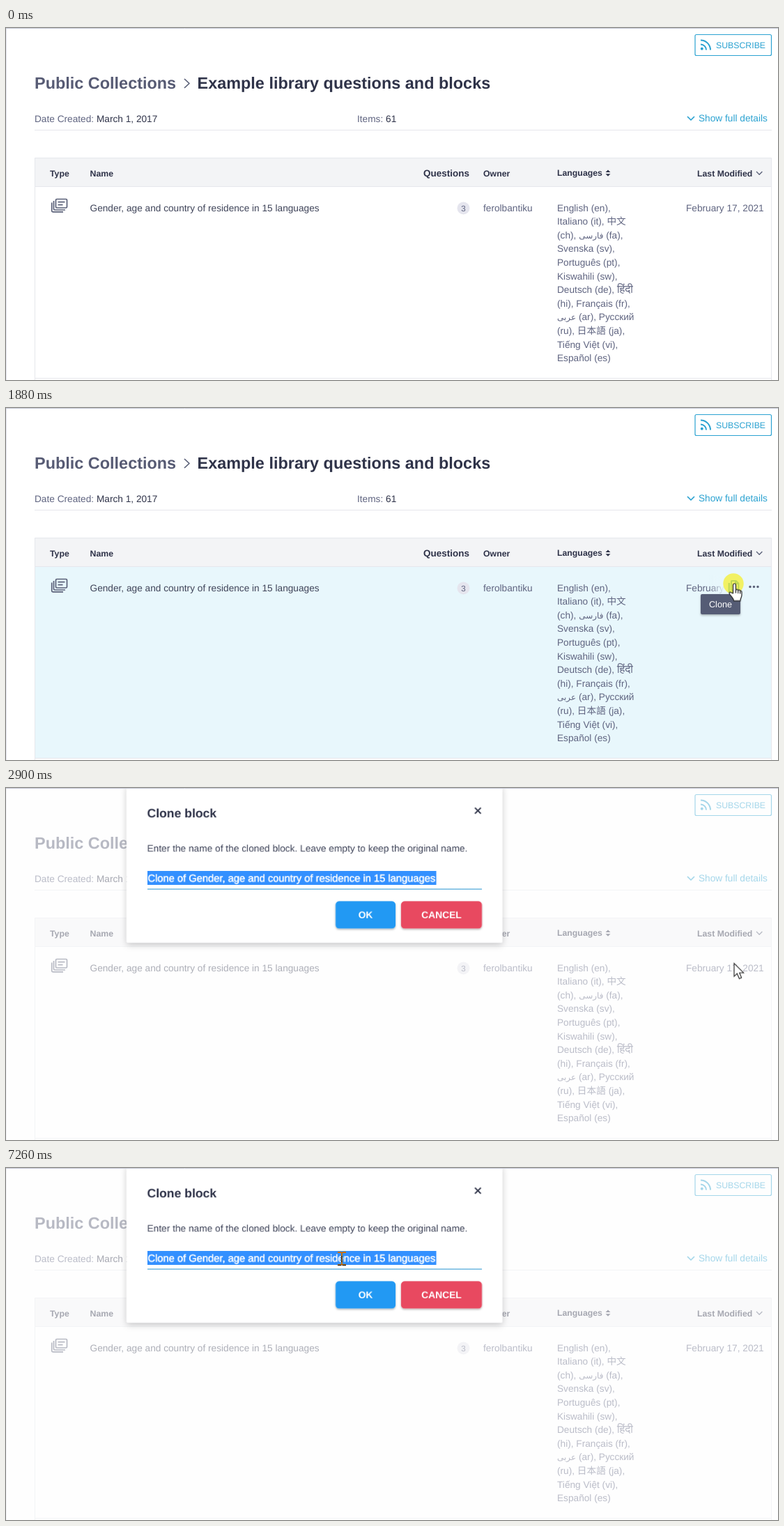
These frames come from a looping animation (1108 px wide and 505 px high, 8000 ms). An HTML page:

```html
<!DOCTYPE html>
<html lang="en">
<head>
<meta charset="utf-8">
<title>Clone block</title>
<style>
  html, body { margin: 0; width: 100%; height: 100%; overflow: hidden; background: #fff; }
  svg { display: block; width: 1108px; height: 505px; }
  text { font: 13.68px "Liberation Sans", Arial, "Noto Sans", "Noto Sans CJK SC", sans-serif;
         fill: #5f6480; text-rendering: geometricPrecision; white-space: pre; }
  .dark { fill: #2f3349; }
  .name { fill: #3f4459; }
  .title { font-size: 23.45px; font-weight: bold; }
  .head text { font-size: 12.3px; font-weight: bold; fill: #2f3349; }
  .head .big { font-size: 13.5px; }
  .link { fill: #2ba2d1; }
  .small { font-size: 12.3px; }
  .arabic { font-size: 12px; }
  .hindi { font-size: 16px; }
  .line { fill: none; stroke: #5a6078; stroke-width: 1.7; stroke-linejoin: round; }
  .blue { stroke: #2ba2d1; }
  .rule { fill: none; stroke: #e6e7ec; }
  .button { font-size: 13.8px; font-weight: bold; fill: #fff; text-anchor: middle; }
  .field { font-size: 14.71px; }

  /* 1% of the loop is 80 ms */
  .hover, .over, .click, .selected { animation: hover 8s step-end infinite; }
  .over { animation-name: over; }
  .click { animation-name: click; }
  .selected { animation-name: selected; }
  .focus { animation: focus 8s linear infinite; }
  .dimmer { animation: dim 8s linear infinite; }
  .dialog { transform-origin: 442.5px 109px; animation: pulse 8s linear infinite; }
  .pointer { animation: move 8s linear infinite, arrow 8s step-end infinite; }
  .hand { animation-name: move, over; }
  .beam { animation-name: move, beam; mix-blend-mode: difference; }

  @keyframes hover { 0%, 100% { opacity: 0 } 2.49% { opacity: 1 } 29.3% { opacity: 0 } }
  @keyframes over { 0%, 100% { opacity: 0 } 8.75% { opacity: 1 } 29.3% { opacity: 0 } }
  @keyframes click { 0%, 100% { opacity: 0 } 23.49% { opacity: 1 } 25.99% { opacity: 0 } }
  @keyframes arrow {
    0% { opacity: 0 } 2.49% { opacity: 1 } 8.75% { opacity: 0 }
    29.3% { opacity: 1 } 66.25%, 100% { opacity: 0 }
  }
  @keyframes beam { 0% { opacity: 0 } 66.25%, 100% { opacity: 1 } }
  @keyframes selected { 0% { opacity: 0 } 33%, 100% { opacity: 1 } }
  @keyframes focus { 0%, 33% { opacity: 0 } 36.2%, 100% { opacity: 1 } }
  @keyframes dim {
    0% { opacity: 0 }
    26% { opacity: 0; animation-timing-function: ease }
    32.25%, 100% { opacity: .58 }
  }
  @keyframes pulse {
    0%, 26% { opacity: 0; transform: scale(.3) }
    27.25% { transform: scale(1.1) }
    28.5% { transform: scale(.903) }
    29.75% { opacity: 1; transform: scale(1.03) }
    31% { transform: scale(.97) }
    32.25%, 100% { opacity: 1; transform: scale(1) }
  }
  @keyframes move {
    0% { transform: translate(1048px, 400px) }
    3.2% { transform: translate(1048px, 400px); animation-timing-function: cubic-bezier(.25, .5, .3, 1) }
    12.6%, 59.2% { transform: translate(1045px, 251.5px) }
    61.9% { transform: translate(975px, 213px) }
    64.4% { transform: translate(790px, 132px) }
    66.25% { transform: translate(615px, 84px) }
    67.5% { transform: translate(520px, 79px) }
    69.4% { transform: translate(474px, 112px) }
    70% { transform: translate(475px, 120px) }
    70.8%, 72.6% { transform: translate(469px, 113.5px) }
    78.4%, 80.1% { transform: translate(478px, 127px) }
    83.4%, 86.6% { transform: translate(480px, 129px) }
    90.7%, 100% { transform: translate(482px, 130px) }
  }
</style>
</head>
<body>
<svg viewBox="0 0 1108 505">
  <defs>
    <linearGradient id="fade">
      <stop offset="0" stop-color="#e8f7fc" stop-opacity="0"/>
      <stop offset=".25" stop-color="#e8f7fc"/>
    </linearGradient>
    <filter id="shadow" x="-10%" y="-15%" width="120%" height="140%">
      <feDropShadow dx="0" dy="3" stdDeviation="5" flood-color="#000" flood-opacity=".2"/>
    </filter>
    <filter id="lift" x="-10%" y="-20%" width="120%" height="150%">
      <feDropShadow dx="0" dy="1.5" stdDeviation="1.5" flood-color="#000" flood-opacity=".3"/>
    </filter>
    <path id="clone" d="M1042 247.800H1047.500L1051.300 251.600V260.500a1 1 0 0 1-1 1H1042a1 1 0 0 1-1-1V248.800a1 1 0 0 1 1-1zM1047 248V252H1051M1037.700 251V263.500a1 1 0 0 0 1 1H1048"/>
  </defs>
  <rect width="1108" height="505" fill="#fff"/>
  <path d="M.5 0V505" stroke="#e4e5ee"/>

  <!-- page head -->
  <rect x="989" y="9.500" width="109.500" height="30" rx="2" class="line blue" style="stroke-width:1.2"/>
  <path d="M997 23.500a8 8 0 0 1 8 8M997 17.500a14 14 0 0 1 14 14" class="line blue" style="stroke-width:2"/>
  <circle cx="998.800" cy="29.700" r="2" class="link"/>
  <text x="1019" y="28.700" class="link small">SUBSCRIBE</text>
  <text x="41" y="87" class="title" style="fill:#575b74">Public Collections</text>
  <path d="M256 73l7 6.500-7 6.500" class="line"/>
  <text x="274.500" y="87" class="title dark">Example library questions and blocks</text>
  <text x="41" y="134.800">Date Created: <tspan class="dark">March 1, 2017</tspan></text>
  <text x="504" y="134.800">Items: <tspan class="dark">61</tspan></text>
  <path d="M978 127l5 5 5-5" class="line blue"/>
  <text x="994" y="134.200" class="link">Show full details</text>
  <path d="M41 146.500H1099" class="rule"/>

  <!-- table -->
  <rect x="41" y="186" width="1058" height="41.500" fill="#f3f4f6"/>
  <rect x="42" y="227.500" width="1056" height="274.500" fill="#e8f7fc" class="hover"/>
  <path d="M41.500 505V186.500H1098.500V505M41.500 502.500H1098.500M41.500 227.500H1098.500" class="rule"/>
  <g class="head">
    <text x="63" y="212.500">Type</text>
    <text x="120.500" y="212.500">Name</text>
    <text x="599" y="213" class="big">Questions</text>
    <text x="685" y="212.500">Owner</text>
    <text x="791" y="212.300">Languages</text>
    <text x="992" y="212.500">Last Modified</text>
  </g>
  <path d="M860.500 207l3.500-3.500 3.500 3.500zM860.500 209.300l3.500 3.500 3.500-3.500z" class="dark"/>
  <path d="M1077 206l4.200 4.200 4.200-4.200" class="line" style="stroke-width:1.3"/>
  <path d="M73 245.500H86a1.500 1.500 0 0 1 1.500 1.500V256.500a1.500 1.500 0 0 1-1.500 1.500H73a1.500 1.500 0 0 1-1.500-1.500V247a1.500 1.500 0 0 1 1.500-1.500zM74.500 249.700H84.500M74.500 253.700H81.500M68.500 248V259.500a1.500 1.500 0 0 0 1.500 1.500H85M65.700 250.500V262.300a1.500 1.500 0 0 0 1.500 1.500H82" class="line"/>
  <text x="120.500" y="262.500" class="name">Gender, age and country of residence in 15 languages</text>
  <circle cx="656.500" cy="258.500" r="9" fill="#e5e5ee"/>
  <text x="656.500" y="262.600" text-anchor="middle" style="font-size:11.700px">3</text>
  <text x="685" y="262.500">ferolbantiku</text>
  <g id="languages"></g>
  <text x="976" y="262.500">February 17, 2021</text>

  <g class="hover">
    <rect x="1009" y="240" width="89" height="35" fill="url(#fade)"/>
    <use href="#clone" class="line"/>
    <g fill="#5a6078">
      <circle cx="1068" cy="256.500" r="1.700"/>
      <circle cx="1073.500" cy="256.500" r="1.700"/>
      <circle cx="1079" cy="256.500" r="1.700"/>
    </g>
  </g>
  <g class="over">
    <use href="#clone" class="line blue"/>
    <rect x="997" y="267" width="57" height="29" rx="2" fill="#555b74" filter="url(#lift)"/>
    <text x="1025.500" y="286" text-anchor="middle" style="fill:#fff;font-size:12.700px">Clone</text>
  </g>

  <rect width="1108" height="505" fill="#fdfdfd" class="dimmer"/>

  <g class="dialog">
    <rect x="173" y="-4" width="539.500" height="226" rx="2" fill="#fff" filter="url(#shadow)"/>
    <text x="202.500" y="42.300" class="dark" style="font-size:17.600px;font-weight:bold">Clone block</text>
    <path d="M673 28.300l8.500 8.500m0-8.500l-8.500 8.500" class="line" style="stroke:#3a3e52;stroke-width:2"/>
    <text x="202.500" y="91.700" class="name" style="font-size:13.72px">Enter the name of the cloned block. Leave empty to keep the original name.</text>
    <text x="203.500" y="134" class="field name">Clone of Gender, age and country of residence in 15 languages</text>
    <path d="M203 145H683" stroke="#d5d6de" stroke-dasharray="1 1"/>
    <path d="M203 145H683" stroke="#48a9dc" stroke-width="1.200" class="focus"/>
    <g class="selected">
      <rect x="203" y="119" width="414" height="20" fill="#3390ff"/>
      <text x="203.500" y="134" class="field" style="fill:#fff;stroke:#fff;stroke-width:.5px">Clone of Gender, age and country of residence in 15 languages</text>
    </g>
    <rect x="473" y="162.500" width="86" height="39" rx="5" fill="#2399f3" filter="url(#lift)"/>
    <text x="516" y="187" class="button">OK</text>
    <rect x="567" y="162.500" width="116" height="39" rx="5" fill="#e84a60" filter="url(#lift)"/>
    <text x="625" y="187" class="button">CANCEL</text>
  </g>

  <path d="M0 .5H1108" stroke="#c6c8d6"/>

  <!-- pointers -->
  <circle cx="1044" cy="252" r="14.700" fill="#f5ee28" fill-opacity=".72" class="click"/>
  <path d="M0 0V18.800l4.300-4 3.100 7.200 3.300-1.400-3-6.900h6z" fill="#fff" stroke="#222" stroke-width="1.100" class="pointer"/>
  <g class="pointer hand">
    <path transform="translate(-9 0)" d="M7.500 14.500V2.500a2 2 0 0 1 4 0V9.500a1.900 1.900 0 0 1 3.200.6 1.800 1.800 0 0 1 3 .8 1.600 1.600 0 0 1 2.300 1.400V17c0 3-2 4-2 8H8.500c0-3-3.500-6-6-9.500-1.500-2.200 1-3.500 2.600-2zM11.500 9.500V14M14.700 10.500V14.500M17.700 11.500V15" fill="#fff" stroke="#222" stroke-width="1.200" stroke-linejoin="round"/>
  </g>
  <path d="M-6-9H-1.500L0-8 1.500-9H6M0-8V8M-6 9H-1.500L0 8 1.500 9H6" fill="none" stroke="#fff" stroke-width="1.800" class="pointer beam"/>
</svg>
<script>
  const lines = [
    'English (en),', 'Italiano (it), 中文', '(ch), فارسی (fa),', 'Svenska (sv),',
    'Português (pt),', 'Kiswahili (sw),', 'Deutsch (de), हिंदी', '(hi), Français (fr),',
    'عربی (ar), Русский', '(ru), 日本語 (ja),', 'Tiếng Việt (vi),', 'Español (es)'
  ];
  const resize = line => line
    .replace(/[\u0600-\u06ff]+/g, '<tspan class="arabic">$&</tspan>')
    .replace(/[\u0900-\u097f]+/g, '<tspan class="hindi">$&</tspan>');
  // left-to-right mark keeps lines that begin with Arabic in reading order
  document.getElementById('languages').innerHTML = lines
    .map((line, i) => `<text x="791" y="${262.5 + i * 19.6}">\u200e${resize(line)}</text>`)
    .join('');
</script>
</body>
</html>
```
